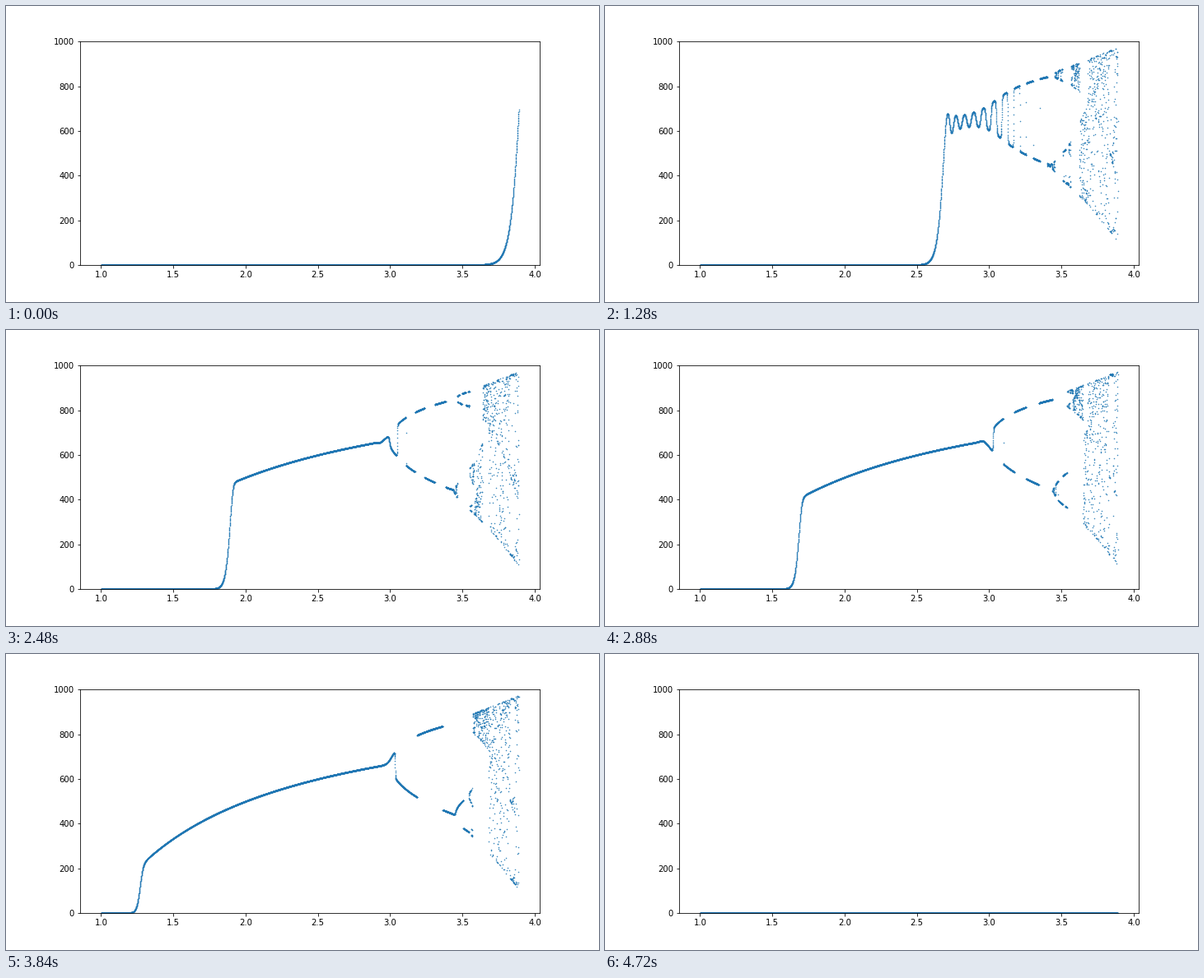
These frames come from a looping animation (720x360 px, 4800 ms). A matplotlib script:

```python
import numpy as np
import matplotlib.pyplot as plt
from matplotlib.animation import FuncAnimation

FRAMES = 60
INTERVAL = 80
CAPACITY = 1000
GENERATIONS = 100

rates = np.linspace(1, 3.89, 5781)


def final_population(start):
    """Logistic growth from the same start for every growth rate."""
    pop = np.full_like(rates, start)
    for _ in range(GENERATIONS):
        pop = rates * pop * (1 - pop / CAPACITY)
    return pop


def update(frame):
    # The starting population grows tenfold per frame, up to the capacity.
    start = 10.0 ** (frame - FRAMES + 4)
    dots.set_data(rates, final_population(start))
    return (dots,)


plt.rcParams["font.family"] = "DejaVu Sans"
plt.rcParams["font.size"] = 10

fig = plt.figure(figsize=(10, 5), dpi=72, facecolor="white")
ax = fig.add_axes([0.125, 0.125, 0.775, 0.755])
(dots,) = ax.plot(rates, np.zeros_like(rates), ".", markersize=1, color="#1f77b4")
ax.set_ylim(0, CAPACITY)

anim = FuncAnimation(fig, update, frames=FRAMES, interval=INTERVAL,
                     repeat=True, repeat_delay=0, blit=False)

plt.show()
```
